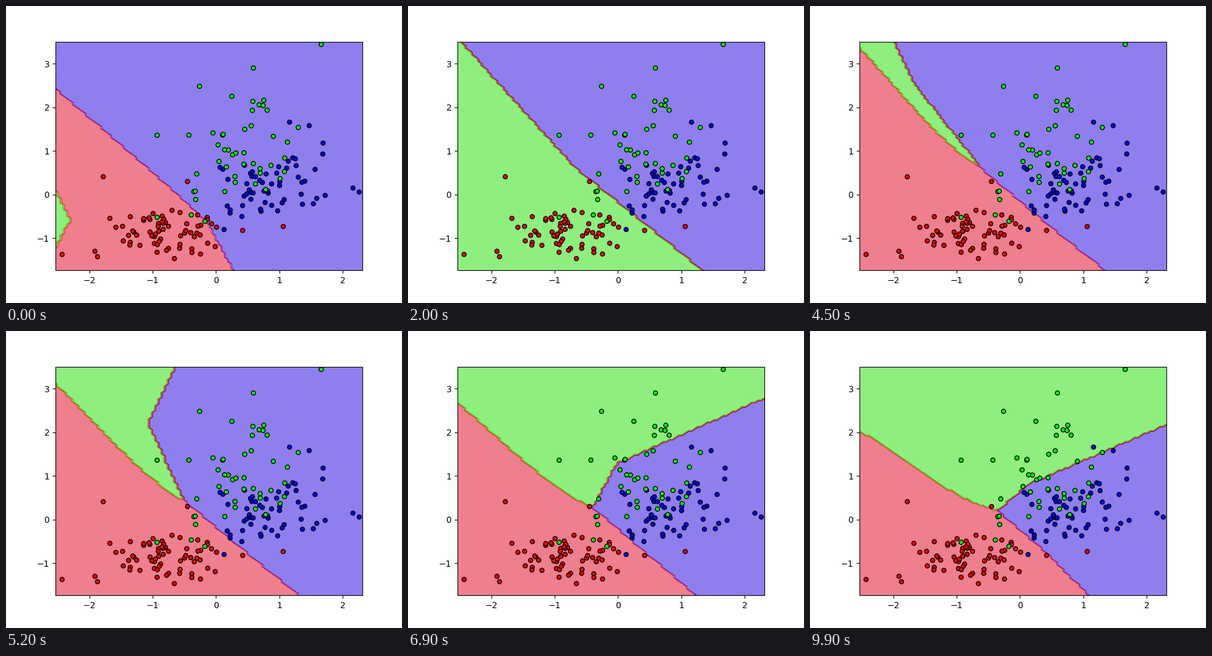
A matplotlib script for the animation above (10000 ms loop, 640 by 480 pixels).

```python
import numpy as np
import matplotlib.pyplot as plt
from matplotlib.animation import FuncAnimation
from matplotlib.path import Path

FRAMES, INTERVAL = 100, 100
XLIM, YLIM = (-2.534, 2.310), (-1.734, 3.504)
COLS, ROWS = 98, 106

# The classifier grid, and the same grid in stage pixels.
xs, ys = np.linspace(*XLIM, COLS), np.linspace(*YLIM, ROWS)
PX, PY = np.meshgrid(np.linspace(80, 576, COLS), np.linspace(427.2, 57.6, ROWS))
GRID = np.column_stack([PX.ravel(), PY.ravel()])


def cluster(rng, n, mean, sd, corr, outliers):
    """A correlated normal cloud with softened tails, plus its outliers."""
    a, b = 2 * np.tanh(rng.standard_normal((2, n - len(outliers))) / 2)
    b = corr * a + np.sqrt(1 - corr ** 2) * b
    cloud = np.column_stack([a, b]) * sd + mean
    return np.vstack([cloud, outliers])


def ease(t, start, tau, power=1):
    return 1 - np.exp(-(max(t - start, 0) / tau) ** power)


def ramp(t, start, end):
    return np.clip((t - start) / (end - start), 0, 1)


def mix(a, b, f):
    return np.array(a, float) * (1 - f) + np.array(b) * f


def blue_border(t):
    """Ray angle, corner, junction, knee and foot of the blue border."""
    slow, fast = np.exp(-t / 0.75), np.exp(-t / 0.6)
    turn = ramp(t, 3.5, 4.5)
    corner = mix((160, 138 + 64 * fast), (170, 128), turn)
    corner = mix(corner, (352, 250), np.array([ease(t, 4.5, 1.3, 1.5),
                                               ease(t, 4.5, 2.1, 1.5)]))
    angle = mix(131.5 + 8 * slow, 116, turn)
    angle = np.radians(mix(angle, 23.4, ease(t, 4.5, 0.8, 1.5)))
    junction = mix((270, 260 + 38 * fast), (278, 264), turn)
    junction = mix(junction, (304, 291), ease(t, 4.5, 1.6))
    knee = mix((395 - 70 * fast, 360 - 10 * fast), (380, 357), ramp(t, 3.5, 8))
    foot = np.array([512 - 132 * slow - 6 * max(t - 3.5, 0), 450])
    return angle, corner, junction, knee, foot


def classify(t):
    angle, corner, junction, knee, foot = blue_border(t)
    far = corner + 900 * np.array([np.cos(angle), -np.sin(angle)])
    outline = [far, corner, junction, knee, foot, (1500, 450), (1500, -2000)]
    blue = Path(outline).contains_points(GRID).reshape(PX.shape)

    # Green first grows as a wedge from the left, then red lifts its lower edge.
    wedge = PX < 103 + 620 * t - 0.5 * abs(PY - 345)
    lift = 1 - (1 - ramp(t, 3.6, 4.5)) ** 2
    left = 500 - 454 * lift + 102 * ramp(t, 4.5, 9.9) ** 0.8
    right = mix(foot, junction, lift)
    u = np.clip((PX - 60) / (right[0] - 60), 0, 1)
    edge = mix(left, right[1], u) + 80 * u ** 2 * (1 - u)
    return np.where(blue, 0, np.where(wedge & (PY < edge), 2, 1))


rng = np.random.default_rng(4)
groups = [
    cluster(rng, 59, (0.88, 0.17), (0.52, 0.50), 0.4,
            [(2.26, 0.06), (2.16, 0.15), (1.69, 1.18), (1.47, 1.58),
             (1.16, 1.66)]),
    cluster(rng, 71, (-0.90, -0.90), (0.56, 0.33), 0.15,
            [(-2.43, -1.37), (-1.78, 0.41), (-0.45, 0.30), (1.06, -0.73),
             (0.42, -0.82)]),
    cluster(rng, 48, (0.20, 0.85), (0.62, 0.85), 0.35,
            [(1.66, 3.44), (0.59, 2.90), (-0.26, 2.48), (-0.93, 1.36),
             (-0.93, -0.52)]),
]
points = np.vstack(groups)
labels = np.repeat([0, 1, 2], [len(g) for g in groups])

fig, ax = plt.subplots(figsize=(6.4, 4.8), dpi=100)
ax.scatter(*points.T, c=labels, cmap="brg", s=25, edgecolors="k", zorder=2)
ax.set(xlim=XLIM, ylim=YLIM)
regions = []


def update(i):
    while regions:
        regions.pop().remove()
    z = classify(i * INTERVAL / 1000)
    regions.append(ax.contourf(xs, ys, z, levels=np.linspace(0, 2, 9),
                               cmap="brg", alpha=0.5, zorder=1))


anim = FuncAnimation(fig, update, frames=FRAMES, interval=INTERVAL,
                     init_func=lambda: update(0), repeat=True)
plt.show()
```
